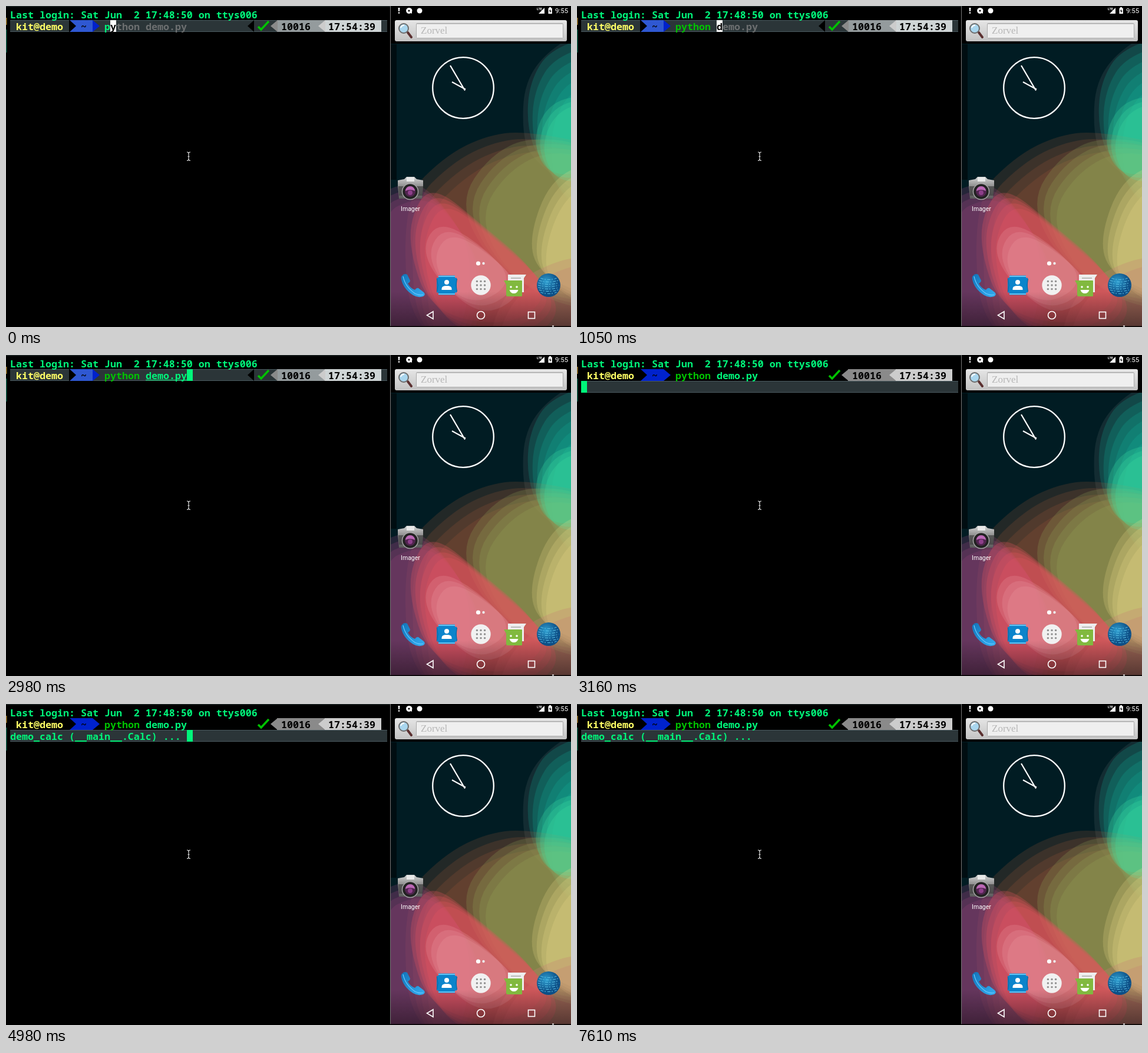
Write an HTML page with a canvas that moves like this. It is 959x545 px and loops after 8 s.

```html
<!DOCTYPE html>
<html lang="en">
<head>
<meta charset="utf-8">
<title>Terminal and phone</title>
<style>
  html, body { margin: 0; width: 100%; height: 100%; overflow: hidden; background: #000; }
  canvas, svg { position: absolute; left: 0; top: 0; display: block; }
  .term text { font: bold 16.667px "Noto Sans Mono", monospace; white-space: pre; fill: #00f57a; }
  .term .ink { fill: #000; }
  .term .user { fill: #ffff66; }
  .term #hint { fill: #6c6f70; }
  .term .check { fill: none; stroke: #00c200; stroke-width: 3.6; }
  #guide { fill: #2b3538; }
  #guideEdge { fill: #4b5a60; }
  .home { fill: #2f58d2; }
  .count { fill: #949b9d; }
  .clock { fill: #cfd5d6; }
  .run .home { fill: #0022cc; }
  .run .count { fill: #8a8a8a; }
  .run .clock { fill: #cccccc; }
  .phone text { font-family: Roboto, sans-serif; fill: #fff; }
  .line { fill: none; stroke: #fff; stroke-width: 1.6; }
</style>
</head>
<body>
<canvas id="wall" width="959" height="545"></canvas>
<svg width="959" height="545" viewBox="0 0 959 545">
  <defs>
    <linearGradient id="bar" x2="0" y2="1">
      <stop stop-color="#e6e6e6"/><stop offset="1" stop-color="#c3c3c3"/>
    </linearGradient>
    <linearGradient id="metal" x2="0" y2="1">
      <stop stop-color="#d4d4d4"/><stop offset=".45" stop-color="#8d8d8d"/><stop offset="1" stop-color="#5c5c5c"/>
    </linearGradient>
    <linearGradient id="call" x2="1" y2="1">
      <stop stop-color="#1173b8"/><stop offset="1" stop-color="#35aef2"/>
    </linearGradient>
    <radialGradient id="earth" cx=".4" cy=".35">
      <stop stop-color="#2f9fd0"/><stop offset="1" stop-color="#0d4f86"/>
    </radialGradient>
  </defs>

  <g class="term" id="term">
    <rect width="652" height="545" fill="#000"/>
    <rect width="652" height="1.5" fill="#1d2424"/>
    <rect y="20" width="1.5" height="12" fill="#a07828"/>
    <rect y="40" width="1.5" height="39" fill="#0d5a45"/>
    <rect x="652" width="1" height="545" fill="#777"/>

    <g id="band">
      <rect id="guideEdge" x="7" y="24" width="640" height="20"/>
      <rect id="guide" x="7" y="25" width="640" height="18"/>
    </g>

    <text x="7" y="21">Last login: Sat Jun  2 17:48:50 on ttys006</text>
    <rect class="home" x="107" y="24" width="40" height="20"/>
    <path class="ink" d="M107 24h1l11 10-11 10h-1z"/>
    <path fill="#0022cc" d="M147 24l12 10-12 10z"/>
    <text class="user" x="17" y="41">kit@demo</text>
    <text class="ink" x="127" y="41">~</text>

    <path class="ink" d="M421 24l-11 10 11 10z"/>
    <path class="check" d="M428 35l5 5 13-14"/>
    <rect class="count" x="460" y="24" width="81" height="20"/>
    <path fill="#8a8a8a" d="M461 24l-12 10 12 10z"/>
    <rect class="clock" x="541" y="24" width="96" height="20"/>
    <path fill="#ccc" d="M542 24l-12 10 12 10z"/>
    <text class="ink" x="467" y="41">10016</text>
    <text class="ink" x="547" y="41">17:54:39</text>

    <text id="cmd" x="167" y="41"></text>
    <text id="arg" x="237" y="41"></text>
    <rect id="under" x="237" y="42" height="1" fill="#00f57a"/>
    <text id="hint" y="41"></text>
    <text id="out" x="7" y="61">demo_calc (__main__.Calc) ...</text>
    <rect id="caret" width="10" height="20"/>
    <text id="glyph" class="ink" y="41"></text>

    <path d="M307 248q3 0 3 2.500q0-2.500 3-2.500M310 250v11M307 262.500q3 0 3-2.500q0 2.500 3 2.500M308.500 255.500h3" fill="none" stroke="#ddd" stroke-width="1.200"/>
  </g>

  <g class="phone">
    <!-- status bar -->
    <g fill="#fff">
      <path d="M665.500 3h3l-.6 6h-1.800zM665.800 10.500h2.400v2.200h-2.400z"/>
      <path d="M684 3a5 5 0 1 0 3 9l2 1v-3a5 5 0 0 0-5-7z"/>
      <circle cx="684" cy="8" r="1.600" fill="#000"/>
      <circle cx="702" cy="8" r="4.500"/>
      <path d="M914 3v10h-10z"/>
      <path d="M920.500 3.500h1.500v-1.500h3v1.500h1.800v9.800h-6.300z"/>
      <path d="M924 5l-2 4h1.500v3l2-4H924z" fill="#000"/>
    </g>
    <text x="901" y="6.500" font-size="5.500" font-weight="700">LTE</text>
    <text x="932" y="12.300" font-size="11.500">9:55</text>

    <!-- search -->
    <rect x="660" y="24" width="292" height="36" rx="3" fill="url(#bar)"/>
    <rect x="696.500" y="29.500" width="249" height="25" rx="1" fill="#efefef" stroke="#aaa"/>
    <path d="M697 30.500h248" stroke="#c6c6c6"/>
    <path d="M682 45l6 8" stroke="#5b3030" stroke-width="4" stroke-linecap="round"/>
    <circle cx="675" cy="38" r="8" fill="#a9d6ee" stroke="#6d6d6d" stroke-width="2"/>
    <path d="M670 37q1-4 6-4.500" stroke="#fff" stroke-width="2" fill="none"/>
    <text x="704" y="47" style="font:17px 'Liberation Serif',serif;fill:#b7b7b7">Zorvel</text>

    <!-- clock -->
    <circle cx="776" cy="139" r="51.800" class="line" style="stroke-width:2.300"/>
    <path d="M780 141.500L757 129M779 143.500L754 101" class="line" style="stroke-width:2.200"/>

    <!-- photo app -->
    <path d="M665 296l11-2 4-4h13l4 4 11 2v9l-2 22h-39l-2-22z" fill="url(#metal)"/>
    <path d="M666 306h42l-1 16h-40z" fill="#3d3d3d" opacity=".65"/>
    <rect x="680" y="291" width="13" height="7" fill="#e9e9e9"/>
    <circle cx="686" cy="315" r="13.500" fill="#222" stroke="#a5a5a5" stroke-width="1.500"/>
    <circle cx="686" cy="315" r="9" fill="#51254f"/>
    <path d="M678 314a8 8 0 0 1 16 0q-8-4-16 0z" fill="#bb68b5"/>
    <circle cx="686" cy="317" r="4" fill="#8d3f8a"/>
    <text x="686.500" y="348" font-size="10.500" text-anchor="middle">Imager</text>

    <circle cx="801.500" cy="437" r="3.600" fill="#fff"/>
    <circle cx="810.500" cy="437" r="2.200" fill="#eee"/>

    <!-- dock -->
    <path d="M672 458q4-5 9-2l5 10q0 3-4 5q4 8 12 11q3-4 6-3l9 7q4 4-1 7q-8 3-17-2q-17-11-20-27q-1-4 1-6z" fill="url(#call)"/>
    <path d="M674 459q3 17 20 29q8 4 14 2" fill="none" stroke="#66c9ff" stroke-width="1.300"/>
    <path d="M734 457.500h28v4h3v25h-3v4h-28v-4h-3v-25h3z" fill="#0b84cb"/>
    <path d="M734 459h28M734 489h28" stroke="#5fc3f4" stroke-width="2"/>
    <path d="M731.500 463q3 11 0 22M765.500 463q-3 11 0 22" fill="none" stroke="#06629a"/>
    <circle cx="748" cy="469" r="4" fill="#fff"/>
    <path d="M739.500 482v-2q0-5 8.500-5t8.500 5v2z" fill="#fff"/>
    <circle cx="806" cy="474" r="16.700" fill="#f1f1f1"/>
    <g id="dots" fill="#8e8e8e"></g>
    <path d="M852 456h31l-4 6v24h-27z" fill="#eee"/>
    <path d="M857 462h17M857 467h17" stroke="#aaa" stroke-width="1.500"/>
    <path d="M845 466h30q1 0 1 1v25q0 1-1 1h-24q-2 0-2-2v-18z" fill="#81b93f"/>
    <circle cx="857" cy="477" r="1.800" fill="#fff"/>
    <circle cx="867" cy="477" r="1.800" fill="#fff"/>
    <path d="M854.500 482h15q-2 6-7.500 6t-7.500-6z" fill="#fff"/>
    <circle cx="921" cy="474" r="20" fill="url(#earth)"/>
    <g id="globe" fill="none" stroke="#5cc2e8" stroke-width="1" stroke-dasharray="5 2 2 3"></g>

    <!-- navigation -->
    <path class="line" d="M714.500 525l10.500-6.300v12.600z"/>
    <circle class="line" cx="806" cy="525" r="6.500"/>
    <rect class="line" x="886.500" y="519.500" width="11" height="11"/>
  </g>
  <rect y="543.500" width="959" height="1.500" fill="#000"/>
  <rect x="927" y="542.500" width="3" height="2" fill="#ddd"/>
</svg>

<script>
const $ = id => document.getElementById(id);

// Wallpaper: stacks of translucent lobes, each shifted a little.
const g = $('wall').getContext('2d');
g.beginPath();
g.rect(653, 0, 306, 545);
g.clip();

function fill(color, x, y, w, h) {
  g.fillStyle = color;
  g.fillRect(x, y, w, h);
}

function lobe(color, layers, dx, dy, pts) {
  g.fillStyle = color;
  const mid = (a, b) => [(a[0] + b[0]) / 2, (a[1] + b[1]) / 2];
  for (let i = 0; i < layers; i++) {
    g.save();
    g.translate(dx * i, dy * i);
    g.beginPath();
    g.moveTo(...mid(pts[pts.length - 1], pts[0]));
    pts.forEach((p, k) => g.quadraticCurveTo(...p, ...mid(p, pts[(k + 1) % pts.length])));
    g.fill();
    g.restore();
  }
}

fill('#011c23', 653, 0, 306, 545);
fill('#000d11', 653, 65, 10, 230);
lobe('rgba(90,110,110,.2)', 1, 0, 0, [[1000, 30], [920, 75], [880, 130], [876, 210], [890, 260], [1000, 340]]);
lobe('rgba(15,185,160,.2)', 6, 8, 13, [[1040, 40], [925, 70], [888, 130], [884, 205], [905, 265], [1040, 360]]);
lobe('rgba(165,90,55,.2)', 4, 12, 11, [[670, 330], [750, 250], [830, 215], [900, 215], [1020, 240], [1020, 600], [690, 600]]);
lobe('rgba(150,175,90,.21)', 4, 11, 8, [[770, 330], [820, 255], [890, 220], [1010, 240], [1010, 500], [890, 480], [810, 420]]);
lobe('rgba(60,222,160,.25)', 3, 7, 6, [[892, 225], [925, 160], [1000, 150], [1000, 280], [920, 290]]);
lobe('rgba(238,220,135,.22)', 4, 8, 9, [[885, 400], [925, 290], [1010, 260], [1010, 500], [910, 460]]);
lobe('rgba(195,130,112,.3)', 2, 12, 12, [[840, 480], [960, 420], [1020, 440], [1020, 620], [810, 620]]);
lobe('rgba(150,70,120,.24)', 4, 6, 9, [[610, 330], [685, 295], [735, 325], [800, 430], [760, 600], [610, 600]]);
lobe('rgba(225,85,95,.28)', 4, 8, 9, [[680, 400], [700, 325], [735, 312], [800, 365], [890, 440], [920, 500], [850, 545], [720, 520]]);
lobe('rgba(232,155,165,.24)', 3, 9, 9, [[705, 410], [735, 365], [800, 400], [865, 465], [800, 510], [735, 470]]);

const shade = g.createLinearGradient(0, 485, 0, 545);
shade.addColorStop(0, 'rgba(25,12,20,0)');
shade.addColorStop(1, 'rgba(25,12,20,.5)');
fill(shade, 653, 485, 306, 60);
fill('#000', 653, 0, 306, 64);

// Small repeated icon details.
$('dots').innerHTML = [...Array(9).keys()].map(i =>
  `<circle cx="${799.4 + i % 3 * 6.6}" cy="${467.4 + (i / 3 | 0) * 6.6}" r="1.7"/>`).join('');
$('globe').innerHTML = [-12, -8, -4, 0, 4, 8, 12].map(d => {
  const r = Math.sqrt(330 - d * d);
  return `<path d="M${921 - r} ${474 + d}q${r} 5 ${2 * r} 0"/>`;
}).join('');

// Typing and program run.
const LINE = 'python demo.py';
const KEYS = [150, 450, 600, 750, 900, 1050, 1340, 1490, 1640, 1790, 1940, 2390, 2540];
const BLINKS = [4500, 4980, 5580, 6050, 6530, 7130, 7610];
const ENTER = 3160, OUTPUT = 3610, LOOP = 8000;
const passed = (times, t) => times.filter(x => t >= x).length;
let last = '';

function draw() {
  const t = performance.now() % LOOP;
  const n = 1 + passed(KEYS, t);
  const blinks = passed(BLINKS, t);
  const run = t >= ENTER, printed = t >= OUTPUT;
  const state = [n, blinks, run, printed].join();
  if (state !== last) {
    last = state;
    const x = 167 + 10 * n;
    $('term').classList.toggle('run', run);
    $('band').setAttribute('transform', `translate(0 ${run ? 20 : 0})`);
    $('cmd').textContent = LINE.slice(0, Math.min(n, 6));
    $('cmd').style.fill = n < 6 ? '#00f57a' : '#00c200';
    $('arg').textContent = LINE.slice(7, Math.max(n, 7));
    $('under').setAttribute('width', run ? 0 : 10 * Math.max(n - 7, 0));
    $('hint').setAttribute('x', x);
    $('hint').textContent = LINE.slice(n);
    $('out').style.display = printed ? '' : 'none';
    const caret = $('caret');
    caret.setAttribute('x', run ? (printed ? 307 : 7) : x);
    caret.setAttribute('y', run ? 44 : 24);
    caret.style.fill = n < LINE.length ? '#fff' : '#00f57a';
    caret.style.display = blinks % 2 ? 'none' : '';
    $('glyph').setAttribute('x', x);
    $('glyph').textContent = LINE[n] || '';
  }
  requestAnimationFrame(draw);
}
draw();
</script>
</body>
</html>
```
